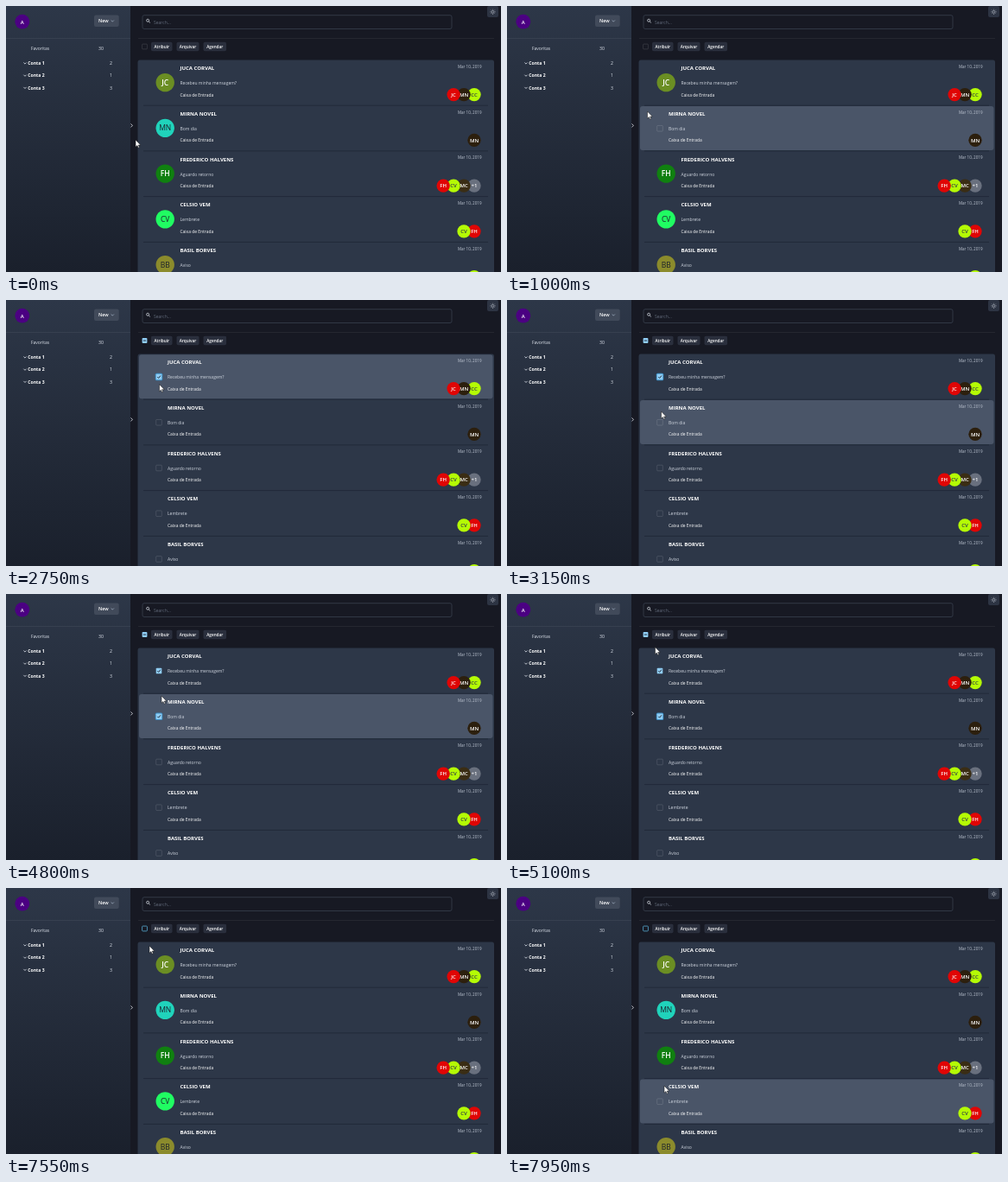
These frames come from a looping animation (573x308 px, 8 s). An HTML page:

```html
<!DOCTYPE html>
<html lang="pt">
<head>
<meta charset="utf-8">
<style>
html, body { margin: 0; width: 100%; height: 100%; overflow: hidden; background: #171923; }
svg { display: block; width: 573px; height: 308px; font-family: "Open Sans", "Noto Sans", sans-serif; }
</style>
</head>
<body>
<svg viewBox="0 0 573 308">
  <defs>
    <linearGradient id="side" x1="0" y1="0" x2="0" y2="1">
      <stop offset="0" stop-color="#2d3748"/><stop offset="1" stop-color="#1a202c"/>
    </linearGradient>
  </defs>
  <g id="page"></g>
  <g id="list"></g>
  <path id="cursor" d="M0 0V8.2L1.9 6.5L3.1 9.2L4.4 8.6L3.2 6H5.8Z" fill="#fff" stroke="#111" stroke-width=".5"/>
</svg>
<script>
const LOOP = 8000, STEP = 50;
const PITCH = 52.75, TOP = 63;
const FIRST = 2200, SECOND = 4100, ALL = 6350, NONE = 7250;

const people = {
  JC: '#e00505', MN: '#2c1f0d', CC: '#b4fb05', FH: '#e00505',
  CV: '#b4fb05', MC: '#3a2d14', '+1': '#69707e'
};
const darkText = ['CC', 'CV'];
const rows = [
  { name: 'JUCA CORVAL', text: 'Recebeu minha mensagem?', tag: 'JC', fill: '#6b8e23', ink: '#fff', team: ['JC', 'MN', 'CC'] },
  { name: 'MIRNA NOVEL', text: 'Bom dia', tag: 'MN', fill: '#20d3bb', ink: '#1a202c', team: ['MN'] },
  { name: 'FREDERICO HALVENS', text: 'Aguardo retorno', tag: 'FH', fill: '#108010', ink: '#fff', team: ['FH', 'CV', 'MC', '+1'] },
  { name: 'CELSIO VEM', text: 'Lembrete', tag: 'CV', fill: '#20fc62', ink: '#1a202c', team: ['CV', 'FH'] },
  { name: 'BASIL BORVES', text: 'Aviso', tag: 'BB', fill: '#8b8b2c', ink: '#1a202c', team: ['CC'] }
];

// Pointer stops: time, x, y
const path = [
  [0, 150, 155], [50, 150, 155], [150, 151.5, 156], [600, 151.5, 156],
  [850, 158, 138], [1150, 167, 106], [1450, 170, 88], [1700, 170, 87],
  [1850, 171, 87.5], [2000, 177, 91], [2650, 177, 91], [2950, 178.5, 111],
  [3150, 178.5, 129], [3650, 178.5, 139], [4700, 178.5, 139],
  [4800, 180, 118], [5050, 172.5, 62.5], [5100, 171.5, 61.5], [5550, 162, 52], [5700, 162, 50],
  [5900, 161, 47.5], [7400, 161, 47.5], [7550, 166, 67], [7900, 181.5, 226], [7950, 182, 229], [8000, 182, 229]
];

const rect = (x, y, w, h, fill, r = 0, more = '') =>
  `<rect x="${x}" y="${y}" width="${w}" height="${h}" rx="${r}" fill="${fill}" ${more}/>`;
const label = (s, x, y, size, fill = '#fff', weight = 400, anchor = 'start') =>
  `<text x="${x}" y="${y}" font-size="${size}" fill="${fill}" font-weight="${weight}" text-anchor="${anchor}">${s}</text>`;
const line = (d, color, width = .7) =>
  `<path d="${d}" fill="none" stroke="${color}" stroke-width="${width}"/>`;
const disc = (x, y, r, fill) => `<circle cx="${x}" cy="${y}" r="${r}" fill="${fill}"/>`;
const down = (x, y, color = '#e2e8f0') => line(`M${x - 1.6} ${y - .8}l1.6 1.6l1.6 -1.6`, color, .8);

function checkbox(x, y, size, mark, focus) {
  const h = size / 2;
  if (!mark) {
    const edge = focus ? '#4a8fb0' : 'rgba(255,255,255,.17)';
    return rect(x - h, y - h, size, size, 'none', .8, `stroke="${edge}" stroke-width="${focus ? 1 : .7}"`);
  }
  const ring = focus ? rect(x - h - .9, y - h - .9, size + 1.8, size + 1.8, '#3e8fc4', 1.5) : '';
  const tick = mark === 'dash' ? `M${x - 1.7} ${y}h3.4` : `M${x - 1.7} ${y + .1}l1.3 1.3l2.3 -2.8`;
  return ring + rect(x - h, y - h, size, size, '#90cdf4', .9) + line(tick, '#1a202c', .9);
}

function drawPage() {
  const rays = Array.from({ length: 8 }, (_, i) => {
    const a = i * Math.PI / 4, c = Math.cos(a), s = Math.sin(a);
    return `M${563.5 + 2.2 * c} ${6.8 + 2.2 * s}L${563.5 + 3.1 * c} ${6.8 + 3.1 * s}`;
  }).join('');
  const accounts = [2, 1, 3].map((n, i) => {
    const y = 66.3 + i * 14.2;
    return down(22, y) + label('Conta ' + (i + 1), 25.3, y + 1.9, 5.1, '#fff', 700) + label(n, 123, y + 1.9, 5.2, '#e2e8f0', 400, 'end');
  }).join('');
  const buttons = [['Atribuir', 168, 24.5], ['Arquivar', 197.5, 26], ['Agendar', 228.5, 26.5]].map(([s, x, w]) =>
    rect(x, 41.7, w, 10.6, '#2a2f3d', 1.8) + label(s, x + w / 2, 48.7, 4.7, '#fff', 600, 'middle')).join('');

  return rect(0, 0, 573, 308, '#171923') + rect(0, 0, 144, 308, 'url(#side)') +
    line('M0 37.5H144M153 37.5H565', 'rgba(255,255,255,.1)', .6) +
    disc(18.8, 18.2, 8.4, '#4b0082') + label('A', 18.8, 20.5, 6, '#fff', 600, 'middle') +
    rect(102, 10.5, 28.7, 13.5, '#414a5a', 2) + label('New', 107, 19.3, 5.4, '#fff', 600) + down(123.3, 17.3, '#a0aec0') +
    label('Favoritas', 29, 50.7, 5, '#e2e8f0') + label('30', 113, 50.5, 5.2, '#e2e8f0', 400, 'end') + accounts +
    line('M144.5 136.4l1.9 2l-1.9 2', '#e2e8f0', .8) +
    rect(158, 10.7, 358, 15.8, 'none', 2, 'stroke="#3d4554" stroke-width=".7"') +
    '<circle cx="164.1" cy="16.7" r="1.5" fill="none" stroke="#e2e8f0" stroke-width=".7"/>' +
    line('M165.2 17.8l1.6 1.6', '#e2e8f0', .8) + label('Search...', 171, 20.6, 5, '#626b7b') +
    rect(557, 0, 13, 13, '#2d3443', 2) +
    '<circle cx="563.5" cy="6.8" r="1.4" fill="none" stroke="#e2e8f0" stroke-width=".5"/>' + line(rays, '#e2e8f0', .5) + buttons +
    rect(152.5, 62.5, 412.5, 260, '#2d3748', 2.5);
}

function drawRow(row, i, state) {
  const y = TOP + i * PITCH, hover = state.hover === i, select = hover || state.any;
  const x = select ? 187 : 201.5;
  let out = i ? line(`M159 ${y - .6}H558`, '#1f2635', .8) : '';
  if (hover) out += rect(154, y + .3, 409.5, 51, '#4a5568', 3);
  out += select
    ? checkbox(177, y + 26, 6.6, state.checked(i) && 'tick', state.focus === i)
    : disc(184.2, y + 25.6, 10.7, row.fill) + label(row.tag, 184.2, y + 28.7, 8.5, row.ink, row.ink === '#fff' ? 600 : 400, 'middle');
  out += label(row.name, x, y + 11, 6, '#fff', 700) +
    label(row.text, x, y + 28.2, 5, '#cfd5df') +
    label('Caixa de Entrada', x, y + 41.5, 4.95, '#fff', 500) +
    label('Mar 10, 2019', 550.5, y + 8.8, 4.55, '#c0c8d4', 400, 'end');
  const last = row.team.length - 1;
  for (let k = last; k >= 0; k--) {
    const cx = 542 - (last - k) * 11.95, tag = row.team[k];
    out += disc(cx, y + 39.6, 7.7, people[tag]) +
      label(tag, cx, y + 41.8, 6, darkText.includes(tag) ? '#2d3748' : '#fff', 600, 'middle');
  }
  return out;
}

function pointer(t) {
  const i = Math.max(1, path.findIndex(p => p[0] >= t));
  const [t0, x0, y0] = path[i - 1], [t1, x1, y1] = path[i];
  const k = (t - t0) / (t1 - t0);
  return [x0 + (x1 - x0) * k, y0 + (y1 - y0) * k];
}

// Row highlight trails the pointer by one step.
function stateAt(t) {
  const [hx, hy] = pointer(Math.max(0, t - STEP));
  const any = t >= FIRST && t < NONE, all = t >= ALL && t < NONE;
  return {
    any, all,
    hover: hx > 153 && hy >= TOP ? Math.floor((hy - TOP) / PITCH) : -1,
    focus: t >= ALL ? 'head' : t >= 5800 ? null : t >= SECOND ? 1 : t >= FIRST ? 0 : null,
    checked: i => all || (any && (i === 0 || (i === 1 && t >= SECOND)))
  };
}

const page = document.getElementById('page');
const list = document.getElementById('list');
const cursor = document.getElementById('cursor');
let shown = '';

function render(time) {
  const t = Math.floor((time % LOOP) / STEP) * STEP;
  const s = stateAt(t);
  const markup = checkbox(160.5, 47, 5.8, s.all ? 'tick' : s.any && 'dash', s.focus === 'head') +
    rows.map((row, i) => drawRow(row, i, s)).join('');
  if (markup !== shown) list.innerHTML = shown = markup;
  cursor.setAttribute('transform', `translate(${pointer(t).join(' ')})`);
}

page.innerHTML = drawPage();
const start = performance.now();
function tick() {
  render(performance.now() - start);
  requestAnimationFrame(tick);
}
tick();
</script>
</body>
</html>
```
